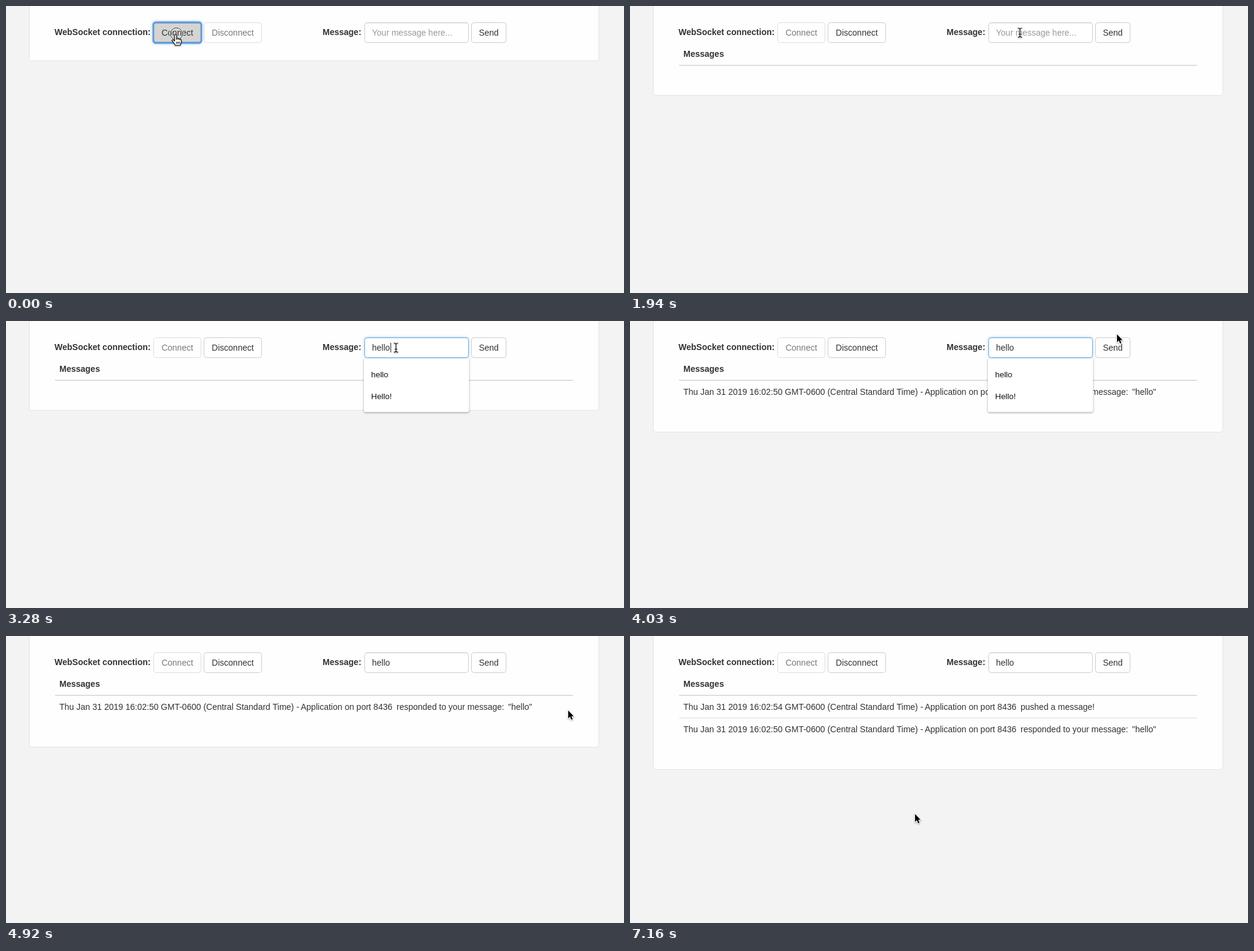
Write an HTML page that moves like this. It is 1019 px wide and 474 px high and loops after 8 s.

```html
<!DOCTYPE html>
<html lang="en">
<head>
<meta charset="utf-8">
<title>WebSocket messages</title>
<style>
  html, body { margin: 0; width: 100%; height: 100%; overflow: hidden; background: #f3f3f3; }
  svg { display: block; width: 100%; height: 100%; }
  text { font: 14px "Liberation Sans", Arial, sans-serif; fill: #333; white-space: pre; }
  .bold { font-weight: 700; }
  .mid { text-anchor: middle; }
  .hint { fill: #999; }
  .option { font-size: 13.4px; fill: #111; }
  .off { opacity: .65; }
  .focus { filter: drop-shadow(0 0 2px rgba(102, 175, 233, .6)); }
  .menu { filter: drop-shadow(0 1px 1.5px rgba(0, 0, 0, .4)); }
  .cursor { filter: drop-shadow(0 1px 1px rgba(0, 0, 0, .35)); }
</style>
</head>
<body>
<svg id="stage" viewBox="0 0 1019 474"></svg>
<script>
const stage = document.getElementById('stage');
const LOOP = 8000;
const DATE = 'Thu Jan 31 2019 16:02:';
const HISTORY = ['hello', 'Hello!', 'how are you?', 'test', 'message', 'Good morning'];

// Pointer stops: time, x, y, shape, click ring
const POINTER = [
  [0, 280, 46, 'hand', true],
  [150, 280, 46, 'hand'],
  [300, 280, 46, 'blocked'],
  [1200, 285, 49, 'blocked'],
  [1350, 307, 64, 'arrow'],
  [1490, 385, 72, 'arrow'],
  [1640, 505, 66, 'arrow'],
  [1790, 608, 50, 'beam'],
  [1940, 643, 44, 'beam'],
  [2080, 643, 44, 'beam', true],
  [2230, 643, 44, 'beam'],
  [3730, 668, 40, 'beam'],
  [3880, 752, 27, 'beam'],
  [4030, 803, 22, 'arrow'],
  [4170, 852, 27, 'arrow'],
  [4320, 902, 42, 'arrow'],
  [4470, 925, 53, 'arrow', true],
  [4620, 925, 53, 'arrow'],
  [4920, 927, 123, 'arrow'],
  [5070, 893, 172, 'arrow'],
  [5220, 815, 218, 'arrow'],
  [5360, 710, 252, 'arrow'],
  [5510, 605, 274, 'arrow'],
  [5660, 525, 286, 'arrow'],
  [5810, 482, 292, 'arrow'],
  [5960, 470, 294, 'arrow']
];
const TYPING = [2680, 2830, 2980, 3130, 3280];

const between = (t, from, to) => t >= from && t < to;
const label = (x, y, str, cls = '') => `<text x="${x}" y="${y}" class="${cls}">${str}</text>`;
const box = (x, y, w, h, fill, stroke, extra = 'rx="4"') =>
  `<rect x="${x}" y="${y}" width="${w}" height="${h}" fill="${fill}" stroke="${stroke}" ${extra}/>`;
const rule = (y, h) => `<rect x="81" y="${y}" width="854" height="${h}" fill="#ddd"/>`;

function button(x, w, str, enabled = true) {
  return `<g class="${enabled ? '' : 'off'}">${box(x, 27.5, w, 33, '#fff', '#ccc')}` +
    `${label(x + w / 2, 49, str, 'mid')}</g>`;
}

function pressedButton(x, w, str) {
  return box(x - .5, 27, w + 1, 34, '#d4d4d4', '#5b9dea', 'rx="4" stroke-width="3" class="focus"') +
    box(x + .5, 28.5, w - 1, 31, '#d4d4d4', '#8c98a8', 'rx="3"') +
    label(x + w / 2, 49, str, 'mid');
}

function input(value, focused, caret) {
  const cls = focused ? 'rx="4" class="focus"' : 'rx="4"';
  const caretX = 604 + [0, 8, 16, 19, 22, 30][value.length];
  return box(591.5, 27.5, 171, 33, '#fff', focused ? '#66afe9' : '#ccc', cls) +
    '<path d="M593 28.5H761" stroke="#000" stroke-opacity=".07"/>' +
    label(603.5, 49, value || 'Your message here...', value ? '' : 'hint') +
    (caret ? `<path d="M${caretX + .5} 36V52" stroke="#222"/>` : '');
}

function menu(value) {
  const low = value.toLowerCase();
  const options = HISTORY.filter(item => item.toLowerCase().startsWith(low));
  const bottom = 78.5 + 36 * options.length;
  return `<path class="menu" d="M590 62H763.5V${bottom - 3}q0 3-3 3H593q-3 0-3-3Z" fill="#fff"/>` +
    options.map((item, i) => label(602, 93 + 36 * i, item, 'option')).join('');
}

function message(y, seconds, tail, quote = '') {
  return label(88, y, `${DATE}${seconds} GMT-0600 (Central Standard Time) -`) +
    label(486, y, 'Application on port 8436') + label(644, y, tail) + label(828, y, quote);
}

const ARROW = '<path d="M0 0V13L3 10.3 5.2 15.2 7.4 14.2 5.2 9.4H9.2Z" stroke="#fff" ' +
  'stroke-width="2" paint-order="stroke"/>';
const BEAM = 'M-3.5-7.5Q0-7.5 0-5.5Q0-7.5 3.5-7.5M0-5.5V5.5M-3.5 7.5Q0 7.5 0 5.5Q0 7.5 3.5 7.5M-2 2.5H2';
const SHAPES = {
  arrow: ARROW,
  blocked: ARROW + '<g fill="none"><circle cx="8.5" cy="22.5" r="7.5" fill="#eee" stroke="#fff" stroke-width="4"/>' +
    '<g stroke="#999" stroke-width="2"><circle cx="8.5" cy="22.5" r="7.5" fill="#eee"/>' +
    '<path d="M3.5 17.5L13.5 27.5"/></g></g>',
  beam: `<g fill="none"><path d="${BEAM}" stroke="#fff" stroke-width="2.4" opacity=".8"/>` +
    `<path d="${BEAM}" stroke="#000" stroke-width="1.1"/></g>`,
  hand: '<path transform="translate(0 1)" fill="#fff" stroke="#000" stroke-width="1.1" stroke-linejoin="round" ' +
    'd="M-2 1.5C-2-.5 1.2-.5 1.2 1.5V7C1.5 5.5 4 5.8 4 7.3C4.5 6.3 6.6 6.6 6.6 8.2C7.2 7.4 9 7.8 9 9.5' +
    'V12C9 14 7.5 15 7.5 18H-1C-1.5 15.5-4 13-6 10.5C-6.8 9-5 8.3-3.8 9.3L-2 11Z' +
    'M1.2 12V15.5M3.5 12V15.5M5.8 12V15.5M1.2 7V9M4 7.3V9M6.6 8.2V9.5"/>'
};

function pointer(t) {
  const [, x, y, shape, click] = POINTER.filter(stop => stop[0] <= t).pop();
  const ring = click ? `<g fill="none"><circle cx="${x + 1}" cy="${y}" r="10" stroke="#fff" stroke-width="3" opacity=".7"/>` +
    `<circle cx="${x + 1}" cy="${y}" r="10" stroke="#222"/></g>` : '';
  return `${ring}<g class="cursor" transform="translate(${x} ${y})">${SHAPES[shape]}</g>`;
}

function scene(t) {
  const connected = t >= 150;
  const answered = t >= 3580;
  const pushed = t >= 7160;
  const focused = between(t, 2080, 4470);
  const value = 'hello'.slice(0, TYPING.filter(time => time <= t).length);
  const bottom = pushed ? 220.5 : answered ? 183.5 : connected ? 147.5 : 90.5;

  return [
    box(38.5, -9.5, 939, bottom + 9.5, '#fefefe', '#e3e3e3'),
    label(80, 48, 'WebSocket connection:', 'bold'),
    connected ? button(243.5, 78, 'Connect', false) : pressedButton(243.5, 78, 'Connect'),
    button(326.5, 95, 'Disconnect', connected),
    label(522, 48, 'Message:', 'bold'),
    input(value, focused, between(t, 2230, 3730)),
    button(767.5, 57, 'Send'),
    connected ? label(88, 84, 'Messages', 'bold') + rule(97, 2) : '',
    pushed ? message(122, 54, 'pushed a message!') + rule(135, 1) : '',
    answered ? message(pushed ? 159 : 122, 50, 'responded to your message:', '"hello"') : '',
    between(t, 2230, 4470) ? menu(value) : '',
    pointer(t)
  ].join('');
}

let shown = '';
const start = performance.now();
function render(now) {
  const next = scene(Math.max(0, now - start) % LOOP);
  if (next !== shown) stage.innerHTML = shown = next;
  requestAnimationFrame(render);
}
render(start);
</script>
</body>
</html>
```
